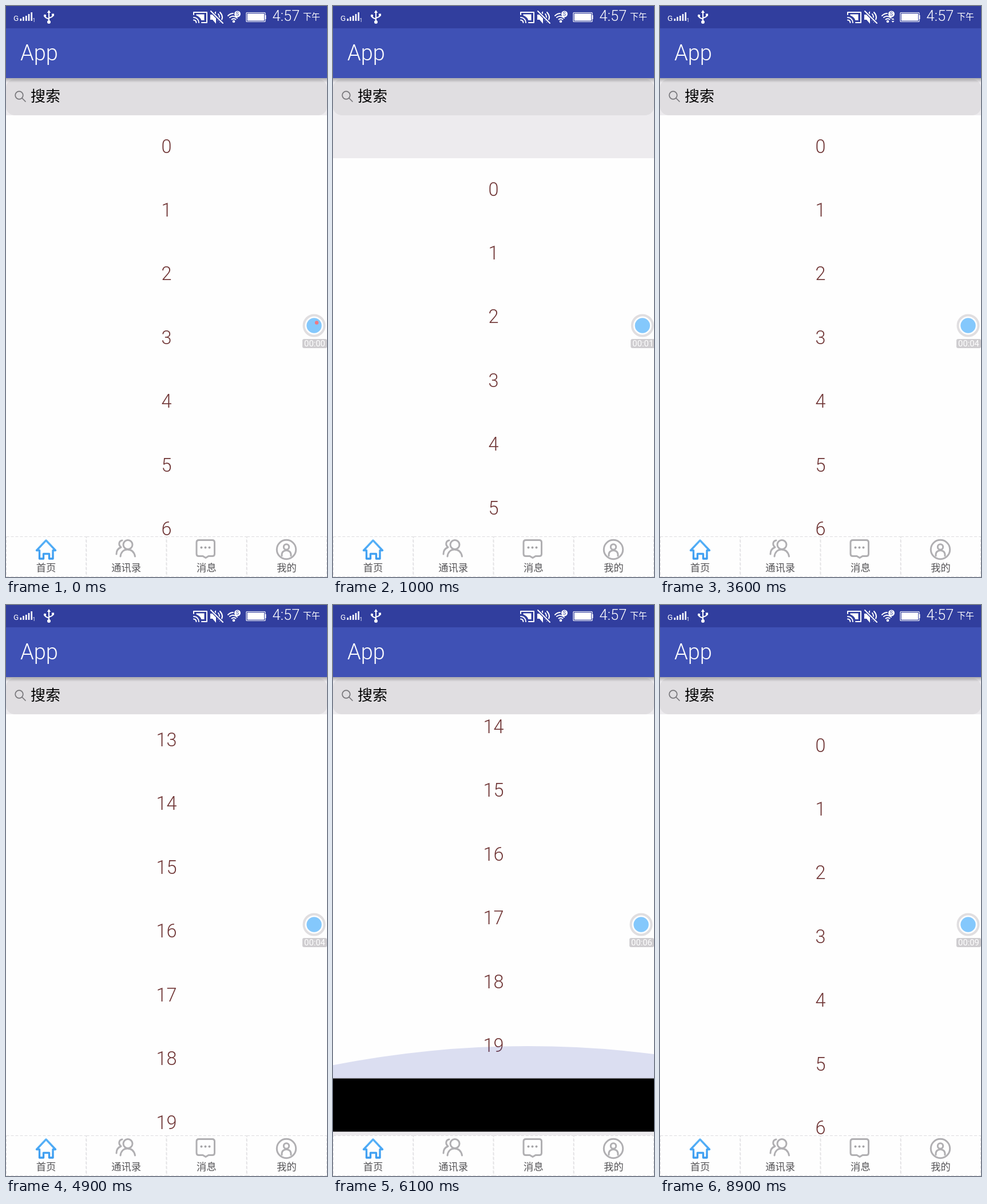
An HTML page that plays this animation: 561 by 998 pixels, repeating every 9 s.

```html
<!DOCTYPE html>
<html lang="zh-CN">
<head>
<meta charset="utf-8">
<title>App</title>
<style>
html, body { margin: 0; width: 100%; height: 100%; overflow: hidden; background: #ecebee; }
svg { display: block; width: 100%; height: 100%; }
text { font-family: Roboto, "Noto Sans", sans-serif; }
.cjk { font-family: "Noto Sans CJK SC", "Noto Sans CJK", sans-serif; }
.light { font-weight: 300; }
.mid { text-anchor: middle; }
.line { fill: none; stroke-linecap: round; stroke-linejoin: round; }
.white { stroke: #fff; stroke-width: 2; }
.tab { stroke: #b0afb2; stroke-width: 3; }
</style>
</head>
<body>
<svg viewBox="0 0 561 998">
  <defs>
    <linearGradient id="shade" x2="0" y2="1">
      <stop stop-color="#000" stop-opacity=".27"/>
      <stop offset="1" stop-color="#000" stop-opacity="0"/>
    </linearGradient>
    <linearGradient id="blue" x2="0" y2="1">
      <stop stop-color="#58b2f8"/>
      <stop offset="1" stop-color="#3b9cf0"/>
    </linearGradient>
    <clipPath id="view"><rect y="191" width="561" height="736"/></clipPath>
    <clipPath id="sheet"><rect width="561" height="2229.5"/></clipPath>
  </defs>

  <rect width="561" height="998" fill="#edebee"/>

  <g clip-path="url(#view)">
    <g id="list">
      <rect width="561" height="2229" fill="#fefefe"/>
      <rect y="2228.500" width="561" height="1.700" fill="#e6e5e8"/>
      <rect y="2230" width="561" height="93"/>
      <g id="rows" class="mid" font-size="32.500" font-weight="350" fill="#703636"></g>
      <circle id="glow" cx="340" r="1750" fill="#3f51b5" clip-path="url(#sheet)"/>
    </g>
  </g>

  <!-- search field -->
  <rect y="128" width="561" height="63" rx="15" fill="#e0dee1"/>
  <g class="line" stroke="#77767a" stroke-width="1.7">
    <circle cx="23" cy="156" r="6.8"/><path d="M28 161l6 6"/>
  </g>
  <text class="cjk" x="43" y="166.500" font-size="26">搜索</text>

  <!-- title bar and status bar -->
  <rect y="126" width="561" height="8" fill="url(#shade)"/>
  <rect y="39" width="561" height="87" fill="#3f51b5"/>
  <rect width="561" height="39" fill="#313e9e"/>
  <text class="light" x="25" y="95" font-size="38" fill="#fff">App</text>
  <g fill="#fff">
    <text x="13" y="26" font-size="13.500">G</text>
    <path d="M24.500 26v-4h2.600v4zM29.200 26v-7h2.600v7zM34 26v-9h2.600v9zM38.700 26v-12h2.600v12zM43.400 26v-15h2.600v15z"/>
    <text x="46.500" y="28" font-size="8.500">1</text>
    <path d="M75 7l3.200 5h-6.400z"/>
    <circle cx="75" cy="28" r="3"/><circle cx="68" cy="17" r="2.200"/>
    <path d="M80 13.500h4v4h-4z"/>
    <path d="M357 15h4l6-6v22l-6-7h-4z"/>
    <path d="M332.500 14.500h14v10.500h-5q-2-6-9-8.500z"/>
    <circle cx="404.500" cy="14" r="5.500"/>
    <circle cx="398" cy="27" r="2.300"/>
    <rect x="421.800" y="13.200" width="29.400" height="12.600"/>
    <rect x="452.500" y="16" width="2" height="7"/>
    <text class="light" x="465.500" y="25.700" font-size="25.500">4:57</text>
    <text class="cjk" x="519" y="23.700" font-size="15">下午</text>
    <path id="arrows" d="M404.500 24l2.500-3 2.500 3zM404.500 26l2.500 3 2.500-3z"/>
  </g>
  <g class="line white">
    <path d="M75 11v16M68 18c0 4 7 3 7 6M82 16c0 5-7 3-7 6"/>
    <path d="M328 15v-4h23v18h-9M328 20a9 9 0 0 1 9 9M328 24.500a4.500 4.500 0 0 1 4.500 4.500"/>
    <path d="M371 14q4 5 0 11M374 11q8 9 0 17"/>
    <path d="M358 9l21 21" stroke="#313e9e" stroke-width="5"/><path d="M358 9l21 21"/>
    <path d="M388 17q4-4 9-4M391 20q6-5 13 1M394.500 23.500q3.500-2.500 7 0"/>
    <rect x="420" y="11.500" width="33" height="16" rx="1" stroke-width="1.200"/>
  </g>
  <text class="mid" x="404.500" y="17.300" font-size="9" fill="#313e9e">S</text>

  <!-- bottom tabs -->
  <rect y="927" width="561" height="71" fill="#fefefe"/>
  <g id="cells" fill="none" stroke="#dddcdf" stroke-dasharray="5 3"></g>
  <g class="line tab">
    <path stroke="url(#blue)" stroke-width="3.400" d="M58.500 966V951.500H53.500L70 934L86.500 951.500H82V966H75.500V957.500H65.500V966Z"/>
    <circle cx="213" cy="941.500" r="8"/>
    <path d="M200 962c1-8 6-12 12-12 7 0 12 4 13.500 12M203 934c-6 1-7 8-2 12-5 2-8 6-8 12"/>
    <path d="M337 933.500h23.500q4 0 4 4v20q0 4-4 4h-6.500l-5 3-5-3h-7q-4 0-4-4v-20q0-4 4-4z"/>
    <circle cx="490" cy="950" r="16.700"/>
    <circle cx="490" cy="945.500" r="4.700"/>
    <path d="M482 961v-2c0-10 16-10 16 0v2"/>
  </g>
  <g fill="#a5a4a7">
    <circle cx="341.500" cy="946.500" r="2"/><circle cx="348.500" cy="946.500" r="2"/><circle cx="355.500" cy="946.500" r="2"/>
  </g>
  <g id="labels" class="mid" font-size="17.300" fill="#555457"></g>

  <!-- floating recorder -->
  <g id="recorder">
    <circle cx="538.500" cy="558.500" r="18" fill="#fefefe" stroke="#e0dee0" stroke-width="4"/>
    <circle cx="538.500" cy="558.500" r="13.200" fill="#84c8fc"/>
    <circle id="dot" cx="543" cy="553.500" r="3.200" fill="#ee7883"/>
    <rect x="518" y="582" width="43" height="16" rx="3" fill="#cfcdd0"/>
    <text id="clock" class="mid" x="539.500" y="594.700" font-size="14.800" fill="#fff"></text>
  </g>
</svg>
<script>
const LOOP = 9000, STEP = 100;
const ROW = 111.475, HEIGHT = 20 * ROW, TOP = 191, MAX_SCROLL = HEIGHT - 736, PULL = 100;
const SECONDS = [1000, 2200, 3000, 3600, 5100, 5700, 7000, 7800, 8600];
const DOT_ON = [[0, 500], [4100, 4200], [6700, 7000]];

const $ = id => document.getElementById(id);
const clamp = v => Math.max(0, Math.min(1, v));
const ramp = (t, a, b) => clamp((t - a) / (b - a));
const smooth = u => u * u * (3 - 2 * u);
const bump = (t, a, peak, b) => Math.min(ramp(t, a, peak), 1 - ramp(t, peak, b));
const within = (t, a, b) => t >= a && t < b;
const setX = (el, x) => el.setAttribute('transform', `translate(${x} 0)`);

$('rows').innerHTML = Array.from({ length: 20 }, (_, i) =>
  `<text x="280.5" y="${i * ROW + 65.5}">${i}</text>`).join('');
['首页', '通讯录', '消息', '我的'].forEach((name, i) => {
  $('labels').innerHTML += `<text class="cjk" x="${70 + i * 140.2}" y="987.5">${name}</text>`;
  $('cells').innerHTML += `<rect x="${0.5 + i * 140.2}" y="927.5" width="139.4" height="70"/>`;
});

function draw(t) {
  const header = t < 3600 ? PULL * ramp(t, 0, 1333) : 0;
  const footer = t < 7900 ? PULL * ramp(t, 5300, 5825) : 0;
  const scroll = MAX_SCROLL * (smooth(ramp(t, 4400, 4950)) - smooth(ramp(t, 8400, 8900)));
  $('list').setAttribute('transform', `translate(0 ${TOP + header - footer - scroll})`);

  const atTop = t < 4000;
  const glow = atTop ? bump(t, 1300, 1600, 2000) : bump(t, 5800, 6100, 6400);
  const reach = 56 * glow - 1750;
  $('glow').setAttribute('cy', atTop ? reach : HEIGHT - reach);
  $('glow').setAttribute('opacity', 0.18 * glow);

  $('clock').textContent = '00:0' + SECONDS.filter(s => t >= s).length;
  $('dot').style.display = DOT_ON.some(([a, b]) => within(t, a, b)) ? '' : 'none';
  $('arrows').style.display = within(t, 3600, 3800) ? '' : 'none';
  setX($('recorder'), within(t, 1000, 1100) || within(t, 7000, 7100) ? 2.3 : 0);
}

function tick() {
  const t = performance.now() % LOOP;
  draw(Math.floor(t / STEP) * STEP);
  requestAnimationFrame(tick);
}
tick();
</script>
</body>
</html>
```
